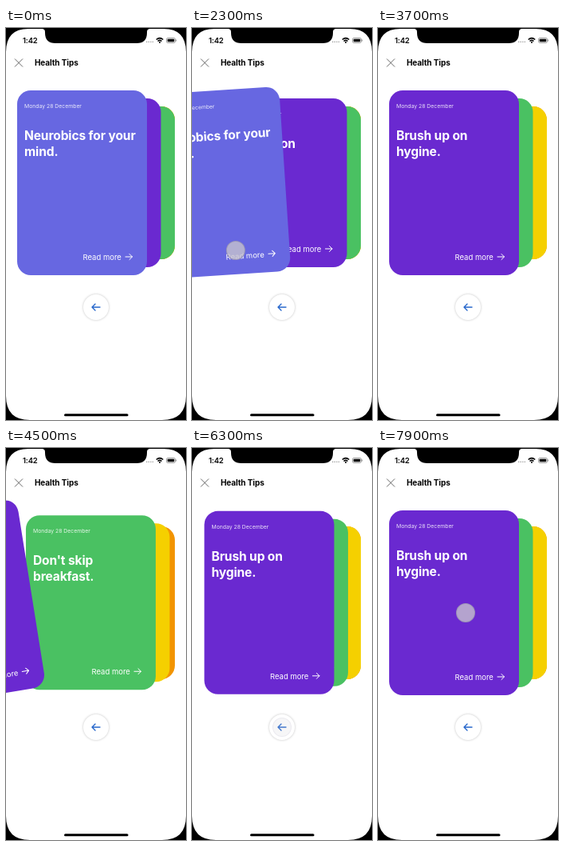
An HTML page that plays this animation: 226 by 490 pixels, repeating every 8000 ms.

```html
<!DOCTYPE html>
<html lang="en">
<head>
<meta charset="utf-8">
<title>Health Tips</title>
<style>
  html, body { margin: 0; width: 100%; height: 100%; overflow: hidden; background: #fff; }
  #stage { position: relative; width: 226px; height: 490px; overflow: hidden; background: #fff;
    font-family: Inter, Roboto, sans-serif; color: #000; }
  #stage > * { position: absolute; }
  #chrome { left: 0; top: 0; z-index: 11; }
  .time { left: 21px; top: 9px; font-weight: 600; font-size: 9.5px; line-height: 13px; letter-spacing: -.2px; }
  .head { left: 36px; top: 37px; font-weight: 700; font-size: 10px; line-height: 13px; letter-spacing: -.1px; }
  .card { left: 14px; top: 78px; width: 163px; border-radius: 17px; color: #fff; }
  .card > * { position: absolute; margin: 0; white-space: pre; }
  .date { left: 9px; top: 15px; font-size: 6.85px; line-height: 9px; opacity: .85; }
  .tip { left: 9px; top: 47px; font-weight: 700; font-size: 15.6px; line-height: 20px; letter-spacing: -.15px; }
  .more { left: 82.5px; bottom: 15.5px; font-size: 9.5px; line-height: 14px; }
  .card svg { left: 135px; bottom: 18px; }
  #touch { left: -12px; top: -12px; width: 22px; height: 22px; border-radius: 50%; z-index: 10;
    background: rgba(202, 198, 206, .78); border: 1px solid rgba(150, 146, 175, .8); }
  .back { left: 97px; top: 333px; width: 32px; height: 32px; border-radius: 50%; background: #fff;
    box-shadow: 0 0 3px rgba(0, 0, 0, .25); }
  .back svg { position: absolute; left: 10px; top: 11px; }
</style>
</head>
<body>
<div id="stage">
  <div class="time">1:42</div>
  <div class="head">Health Tips</div>
  <div class="back">
    <svg width="12" height="10" fill="none" stroke="#2868cc" stroke-width="1.4" stroke-linecap="round" stroke-linejoin="round">
      <path d="M11 5H1M5 1L1 5L5 9"/>
    </svg>
  </div>
  <div id="touch"></div>
  <svg id="chrome" width="226" height="490">
    <path fill-rule="evenodd" d="M0 0H226V490H0ZM28 1H45Q49 1 49 5V6Q49 19 62 19H164Q177 19 177 6V5Q177 1 181 1H198Q226 1 226 30V460Q226 490 196 490H30Q0 490 0 460V30Q0 1 28 1Z"/>
    <rect x="73" y="482.3" width="80.5" height="3" rx="1.5"/>
    <path d="M11 38.5l10 10m0-10l-10 10" stroke="#666"/>
    <path d="M176 17.3h9" stroke="#999" stroke-width="1.3" stroke-dasharray="1.3"/>
    <path d="M188.7 14.5q4.3-3.8 8.6 0m-6.8 2q2.500-2.200 5 0" fill="none" stroke="#000" stroke-width="1.5"/>
    <circle cx="193" cy="18" r="1"/>
    <rect x="201.5" y="12.5" width="11" height="6" rx="1.7" fill="none" stroke="#888" stroke-width=".8"/>
    <rect x="202.7" y="13.7" width="8.6" height="3.6" rx=".8"/>
    <path d="M213.7 14.5v2" stroke="#888"/>
  </svg>
</div>
<script>
const LOOP = 8000, FLING = 400, EXIT = -319, PULL = -40, TILT = 0.063;
const HYGIENE = 'Brush up on\nhygine.';
const TIPS = [
  ['#6767e1', 'Neurobics for your\nmind.'],
  ['#6a29d0', HYGIENE],
  ['#4ac162', "Don't skip\nbreakfast."],
  ['#f5d000', HYGIENE],
  ['#f29400', HYGIENE]
];

// A swipe: finger down, pull left, let go. The first one sways before release.
const swipe = (press, pull, release, sway = 0, x = 115, y = 224) => ({ press, pull, release, sway, x, y });
const SWIPES = [
  swipe(100, 700, 3230, 21, 115, 231),
  swipe(3960, 4130, 4335),
  swipe(4740, 4750, 4860),
  swipe(6610, 6640, 7180),
  swipe(7820, LOOP, LOOP + FLING, 0, 110, 206)
];
// Taps on the back button bring the last card back.
const TAPS = [5300, 5850, 6230].map(t => ({ press: t - 70, release: t, x: 113, y: 349 }));

const clamp = (v, lo = 0, hi = 1) => Math.min(hi, Math.max(lo, v));
const ease = v => { const k = clamp(v); return k * k * (3 - 2 * k); };
const flung = (list, t) => list.reduce((sum, g) => sum + ease((t - g.release) / FLING), 0);

function dragAt(t) {
  const s = SWIPES.find(s => t >= s.press && t < s.release + FLING);
  if (!s) return 0;
  const held = Math.min(t, s.release), swayed = Math.max(0, held - s.pull - 700);
  return PULL * ease((held - s.pull) / 200) + s.sway * Math.sin(swayed / 1280 * 2 * Math.PI);
}

const stage = document.getElementById('stage');
const touch = document.getElementById('touch');
const cards = TIPS.map(([color, tip], i) => {
  const el = document.createElement('div');
  el.className = 'card';
  el.style.background = color;
  el.style.zIndex = TIPS.length - i;
  el.innerHTML = `<p class="date">Monday 28 December</p><p class="tip">${tip}</p><p class="more">Read more</p>
    <svg width="11" height="10" fill="none" stroke="#fff" stroke-linecap="round" stroke-linejoin="round">
    <path d="M1 5H9.5M6 1.500L9.500 5L6 8.500"/></svg>`;
  return stage.appendChild(el);
});

function draw(t) {
  const deck = flung(SWIPES, t) - flung(TAPS, t), drag = dragAt(t);
  cards.forEach((el, i) => {
    const depth = clamp(i - deck, -1, 2), out = Math.max(0, -depth);
    const held = i === Math.floor(deck) ? drag : 0;
    const dx = held + (EXIT - held) * out;
    el.style.visibility = out < 1 ? 'visible' : 'hidden';
    el.style.height = 231 - 20 * depth + 'px';
    el.style.transform =
      `translate(${dx + 17.5 * Math.max(0, depth)}px, ${10 * depth}px) rotate(${dx * TILT}deg)`;
  });

  const finger = [...SWIPES, ...TAPS].find(g => t >= g.press && t < g.release + 90);
  touch.style.opacity = finger ? clamp(Math.min((t - finger.press) / 80, (finger.release + 90 - t) / 90)) : 0;
  if (finger) touch.style.transform = `translate(${finger.x + drag}px, ${finger.y - 0.78 * drag}px)`;
}

const start = performance.now();
function tick() {
  draw((performance.now() - start) % LOOP);
  requestAnimationFrame(tick);
}
tick();
</script>
</body>
</html>
```
